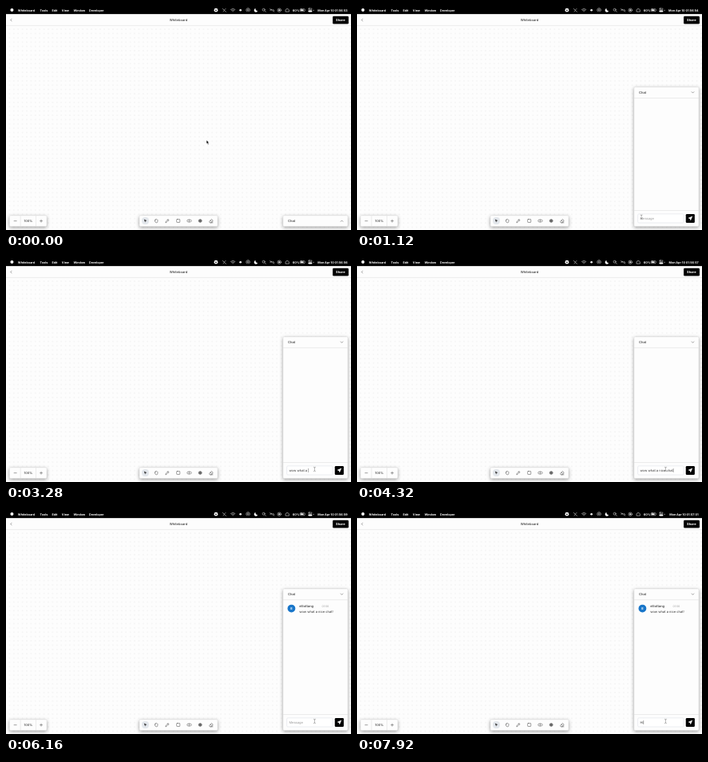
An HTML page for the animation above (8000 ms loop, 432 by 281 pixels).

```html
<!DOCTYPE html>
<html lang="en">
<head>
<meta charset="utf-8">
<title>Whiteboard</title>
<style>
  html, body { margin: 0; width: 100%; height: 100%; overflow: hidden; background: #fff; }
  svg { display: block; width: 432px; height: 281px; font: 500 12px Inter, "Liberation Sans", sans-serif; }
  text { text-rendering: geometricPrecision; fill: #333; }
  .menu text { font-size: 11px; font-weight: 700; fill: #fff; }
  .line { fill: none; stroke: #444; stroke-width: 1.5; stroke-linecap: round; stroke-linejoin: round; }
  .menu .line { stroke: #fff; }
  .card { fill: #fdfdfd; stroke: #d4d4d4; filter: drop-shadow(0 4px 6px rgba(0, 0, 0, .38)); }
  .rule { stroke: #dcdcdc; stroke-width: 1.5; }
  .entry { font-weight: 400; }
  .light { fill: #fff; }
  .dim { fill: #999; }
</style>
</head>
<body>
<svg viewBox="0 0 432 281">
  <defs>
    <pattern id="dots" x="5" y="78" width="16" height="16" patternUnits="userSpaceOnUse">
      <circle cx="8" cy="8" r="1.2" fill="#bbb"/>
    </pattern>
    <clipPath id="clip"><rect id="clipBox" x="1028" width="240" rx="4"/></clipPath>
  </defs>
  <g transform="scale(.3375)">
    <rect width="1280" height="834" fill="#fdfdfd"/>
    <rect y="74" width="1280" height="760" fill="url(#dots)"/>
    <path class="rule" d="M0 73H1280"/>

    <g class="menu">
      <rect width="1280" height="30" fill="#000"/>
      <circle cx="22" cy="15" r="6" fill="#fff"/>
      <g id="menuItems"></g>
      <circle cx="779" cy="15.500" r="7" fill="#fff"/>
      <circle cx="779" cy="15.500" r="2.500" fill="#000"/>
      <path class="line" d="M804 10l12 12M815 10l-5 5M806 21l3-3"/>
      <path class="line" d="M834 13q8-7 16 0M837 16.500q5-4 10 0M841 20h2" stroke-width="2.500"/>
      <circle cx="870" cy="15.500" r="4" fill="#fff"/>
      <path class="line" d="M893 20a7 7 0 1 1 10 0M896 17a3 3 0 1 1 4 0M898 17v4"/>
      <path d="M926 9a7 7 0 1 0 8 9a7 7 0 0 1-8-9" fill="#fff"/>
      <circle class="line" cx="956" cy="14" r="4.500"/>
      <path class="line" d="M960 18l4 4M979 11l16 10M980 17q2-5 6-4M990 13q3 0 5 4"/>
      <circle class="line" cx="1014" cy="15.500" r="6.500"/>
      <circle cx="1014" cy="15.500" r="3" fill="#fff"/>
      <path class="line" d="M1037 20v-5l3-4h7l3 4v5z" stroke-width="1"/>
      <text x="1063" y="19.500">60%</text>
      <rect class="line" x="1091" y="11" width="18" height="9" rx="3"/>
      <rect x="1093" y="13" width="11" height="5" fill="#fff"/>
      <rect class="line" x="1122" y="9" width="13" height="5" rx="2.500"/>
      <rect x="1121" y="16" width="15" height="6" rx="3" fill="#fff"/>
      <circle cx="1141" cy="15.500" r="1.500" fill="#fff"/>
      <text id="clock" x="1267" y="19.500" text-anchor="end"></text>
    </g>

    <path class="line" d="M21 48l-4 4l4 4"/>
    <text x="640" y="56.500" text-anchor="middle">Whiteboard</text>
    <rect x="1212" y="38" width="59" height="29" rx="4" fill="#000"/>
    <text class="light" x="1241" y="56.500" text-anchor="middle" font-weight="700">Share</text>

    <rect class="card" x="13" y="779" width="138" height="40" rx="4"/>
    <path class="rule" d="M54 780v38M111 780v38"/>
    <path class="line" d="M30 799h9M126 799h9M130.500 794.500v9"/>
    <text x="82.500" y="803" text-anchor="middle" font-size="11.500">100%</text>

    <rect class="card" x="495" y="779" width="290" height="40" rx="4"/>
    <rect x="504" y="785.500" width="26" height="26" rx="11" fill="#e3e7ec"/>
    <g id="tools"></g>

    <rect class="card" id="panel" x="1028" width="240" rx="4"/>
    <g clip-path="url(#clip)">
      <g id="header">
        <rect id="press" x="1029" width="217" height="40" fill="#cdcdcd"/>
        <text x="1046" y="24">Chat</text>
        <path id="chevron" class="line"/>
        <path class="rule" id="headRule" d="M1028 41h240"/>
      </g>
      <g id="message">
        <circle cx="1059" cy="366" r="14.500" fill="#1976c9"/>
        <text class="light" x="1059" y="370.500" text-anchor="middle" font-weight="700">E</text>
        <text x="1088" y="361">elliottang</text>
        <text class="dim" x="1172" y="361" font-size="10" font-weight="400">01:56</text>
        <text class="entry" x="1088" y="381">wow what a nice chat!</text>
      </g>
      <g id="footer">
        <path class="rule" d="M1028 760h240"/>
        <rect x="1042" y="773" width="170" height="33" rx="4" fill="#fff" stroke="#d9dde5" stroke-width="1.500"/>
        <text class="entry" id="entry" x="1050" y="794" xml:space="preserve"></text>
        <path id="caret" d="M0 782v15" stroke="#333" stroke-width="1.200"/>
        <rect x="1220" y="773" width="33" height="33" rx="4" fill="#000"/>
        <path d="M1245 781l-17 7l7 3l3 7z" fill="#fff"/>
      </g>
    </g>

    <path id="arrow" d="M0 0v13l3-3l2.500 5.500l2.500-1l-2.500-5.500h4z" fill="#000" stroke="#fff"/>
    <path id="beam" class="line" stroke-opacity=".7" d="M-3-8q3 0 3 3q0-3 3-3M0-5v10M-3 8q3 0 3-3q0 3 3 3"/>
  </g>
</svg>
<script>
const $ = id => document.getElementById(id);
const LOOP = 8000, SEND = 4600, RETYPE = 7700;
const FIRST = "wow what a nice chat!", SECOND = "Hi";

$("menuItems").innerHTML = [["Whiteboard", 44], ["Tools", 126], ["Edit", 170], ["View", 207], ["Window", 250], ["Developer", 308]]
  .map(([name, x]) => `<text x="${x}" y="19.5">${name}</text>`).join("");

// Icons are drawn around their own centre.
const icons = [
  '<path d="M-5-6l11 5l-5 2l-2 5z" fill="#333"/>',
  '<path class="line" d="M-5 1v-4q2-1 2 1v-4q2-1 2 0q2-1 3 1q2 0 3 2v5q0 5-5 5q-3 0-5-5"/>',
  '<path class="line" d="M-6 6l1-4l8-8l3 3l-8 8zM1-4l3 3"/>',
  '<rect class="line" x="-6" y="-6" width="12" height="12" rx="2"/>',
  '<path class="line" d="M-2-4h-2a4 4 0 0 0 0 8h2M2-4h2a4 4 0 0 1 0 8h-2M0-5v10"/>',
  '<circle r="6.5" fill="#aaa"/><path class="line" d="M-6 0h12M0-6v12M-5-3h10M-5 3h10"/>',
  '<path class="line" d="M-6 2l7-8l5 4v4l-5 5h-5zM-3-1l6 4M-2 7h8"/>'
];
$("tools").innerHTML = icons
  .map((shape, i) => `<g transform="translate(${517 + 40.7 * i} 798.5)">${shape}</g>`).join("");

// Time, x, y of the pointer.
const route = [[0, 744, 499], [80, 744, 499], [640, 1055, 798], [800, 1055, 798], [940, 1055, 784],
  [1100, 1055, 784], [1700, 1145, 785], [LOOP, 1145, 785]];

const clamp = v => Math.max(0, Math.min(1, v));
const ease = p => p < .5 ? 2 * p * p : 1 - 2 * (1 - p) ** 2;
const show = (id, on) => $(id).style.display = on ? "" : "none";

function pointer(t) {
  const i = route.findIndex(k => k[0] > t);
  const [a, b] = [route[i - 1], route[i]];
  const p = ease((t - a[0]) / (b[0] - a[0]));
  return [a[1] + (b[1] - a[1]) * p, a[2] + (b[2] - a[2]) * p];
}

function typed(t) {
  if (t < SEND) return FIRST.slice(0, Math.max(0, Math.floor((t - 2000) / 115)));
  return SECOND.slice(0, Math.max(0, Math.floor((t - RETYPE) / 90) + 1));
}

function caretOn(t, typing) {
  if (t < 2050) return false;
  return typing || (t > SEND && (t - SEND) % 1000 < 500);
}

function drawPanel(t) {
  const open = ease(clamp((t - 894) / 250));
  const top = 779 - 486 * open;
  for (const id of ["panel", "clipBox"]) {
    $(id).setAttribute("y", top);
    $(id).setAttribute("height", 819 - top);
  }
  $("header").setAttribute("transform", `translate(0 ${top})`);
  $("footer").style.opacity = open ** 1.4;
  $("chevron").setAttribute("d", open > .1 ? "M1242 18l4 4l4-4" : "M1242 22l4-4l4 4");
  show("press", t >= 880 && t < 1060);
  show("headRule", open > 0);
}

function drawEntry(t) {
  const text = typed(t), entry = $("entry");
  entry.textContent = text || "Message";
  entry.classList.toggle("dim", !text);
  const x = 1051 + (text ? entry.getComputedTextLength() : 0);
  $("caret").setAttribute("transform", `translate(${x} 0)`);
  show("caret", caretOn(t, text !== ""));
  show("message", t >= SEND + 160);
}

function draw(t) {
  const sec = 53 + Math.floor((t + 160) / 1000);
  const pad = n => String(n).padStart(2, "0");
  $("clock").textContent = `Mon Apr 10 01:${56 + Math.floor(sec / 60)}:${pad(sec % 60)}`;
  drawPanel(t);
  drawEntry(t);
  const at = `translate(${pointer(t).join(" ")})`;
  $("arrow").setAttribute("transform", at);
  $("beam").setAttribute("transform", at);
  show("arrow", t < 940);
  show("beam", t >= 940);
}

const start = performance.now();
function tick() {
  draw((performance.now() - start) % LOOP);
  requestAnimationFrame(tick);
}
tick();
</script>
</body>
</html>
```
